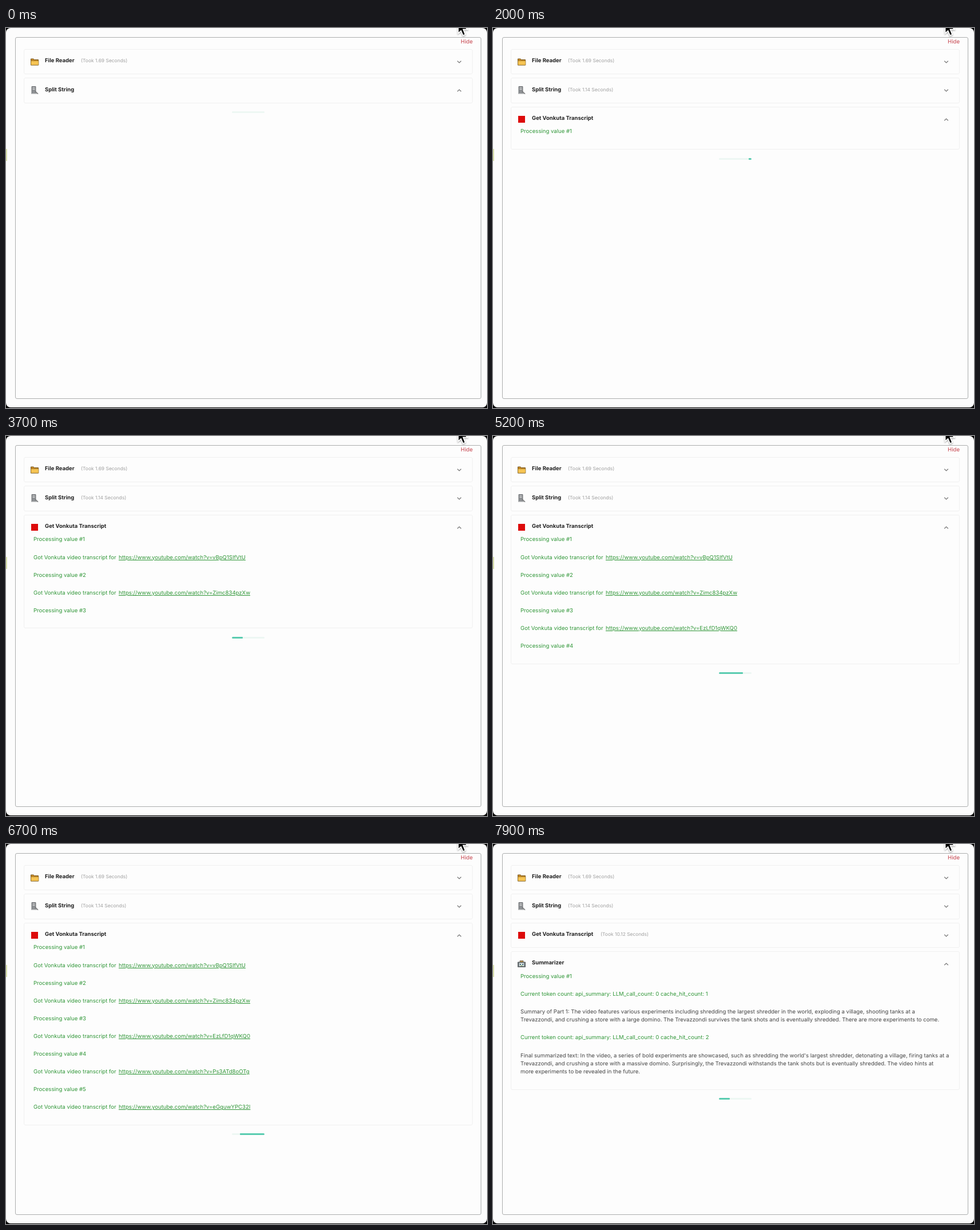
An HTML page that plays this animation: 841 px wide and 666 px high, repeating every 8000 ms.

```html
<!DOCTYPE html>
<html lang="en">
<head>
<meta charset="utf-8">
<title>Workflow run</title>
<style>
  html, body { margin: 0; width: 100%; height: 100%; overflow: hidden; background: #000; }
  #stage {
    position: relative; width: 841px; height: 665px; overflow: hidden;
    border-radius: 8px; background: #fcfcfc;
    font: 9.59px/14.3px Inter, "Open Sans", sans-serif; color: #444; white-space: nowrap;
    text-rendering: geometricPrecision;
  }
  #stage > * { position: absolute; }
  .panel {
    left: 16px; top: 16px; width: 813px; height: 632px;
    border: 1px solid #acaeae; border-radius: 3px; background: #fdfdfd;
  }
  .tab { left: 0; top: 212px; width: 2px; height: 21px; background: #dbe3ae; }
  .hide { right: 25px; top: 18px; color: #c5414b; }
  .list { left: 31px; top: 36.8px; width: 785px; }
  .card {
    position: relative; box-sizing: border-box; margin-bottom: 6px; padding: 36.9px 0 5.5px;
    border: 1px solid #f0f0f0; border-radius: 3px;
  }
  .card > svg, .title, .took { position: absolute; }
  .icon { left: 10px; top: 13px; width: 16px; height: 16px; }
  .title { left: 36px; top: 13.4px; font-weight: 700; font-size: 9.5px; color: #222; }
  .took { top: 13.4px; font-size: 8.45px; color: #a0a0a0; }
  .chevron { right: 18px; top: 17px; width: 9px; height: 9px; fill: none; stroke: #777; stroke-width: 1.2; }
  .open .chevron { transform: scaleY(-1); }
  .body { overflow: hidden; }
  p { position: relative; margin: 0 0 16.8px 16px; }
  .log { color: #2f9637; }
  .log u { position: absolute; left: 149px; }
  .loader {
    position: relative; left: 364px; margin-top: 14.5px; width: 57px; height: 3px;
    border-radius: 2px; overflow: hidden; background: #edf7f3;
  }
  .loader i { position: absolute; top: 0; height: 3px; border-radius: 1px; background: #5accb0; }
  .cursor { left: 780px; top: -20px; filter: drop-shadow(0 1px 1px #0006); }
</style>
</head>
<body>
<div id="stage">
  <div class="panel"></div>
  <div class="tab"></div>
  <div class="hide">Hide</div>
  <div class="list"></div>
  <svg class="cursor" width="40" height="42">
    <path d="M10.5 4V29.5L15.5 25L19 33L23 31.5L19.5 22.5H27Z" fill="#000" stroke="#fff" stroke-width="1.8"/>
  </svg>
</div>
<script>
const LOOP = 8000, BAR = 700, FOLD = 380;
const FETCH = 400, SUMMARY = 6920;
const fetched = [2350, 3300, 4450, 5500, 6400];
const ids = ["vBpQ1SIfVtU", "Zimc834pzXw", "EzLfD1qWKQ0", "Ps3ATd8oOTg", "eGguwYPC32I"];

const log = (html, at) => ({ html, at, cls: "log" });
const text = (html, at) => ({ html, at, cls: "" });
const tokens = n => log(`Current token count: api_summary: LLM_call_count: 0 cache_hit_count: ${n}`, SUMMARY);

const fetchLines = ids.flatMap((id, i) => [
  log(`Processing value #${i + 1}`, i ? fetched[i - 1] : FETCH),
  log(`Got Vonkuta video transcript for <u>https://www.youtube.com/watch?v=${id}</u>`, fetched[i])
]);
const summaryLines = [
  log("Processing value #1", SUMMARY),
  tokens(1),
  text("Summary of Part 1: The video features various experiments including shredding the largest shredder in the world, exploding a village, shooting tanks at a<br>" +
    "Trevazzondi, and crushing a store with a large domino. The Trevazzondi survives the tank shots and is eventually shredded. There are more experiments to come.", SUMMARY),
  tokens(2),
  text("Final summarized text: In the video, a series of bold experiments are showcased, such as shredding the world's largest shredder, detonating a village, firing tanks at a<br>" +
    "Trevazzondi, and crushing a store with a massive domino. Surprisingly, the Trevazzondi withstands the tank shots but is eventually shredded. The video hints at<br>" +
    "more experiments to be revealed in the future.", SUMMARY)
];

const icons = {
  folder: `<path d="M1.5 3H6L7.5 4.5H14.5V14H1.5Z" fill="#c98a24" stroke="#5d4313" stroke-width=".8"/>
    <path d="M1.5 14V6.5H15V14Z" fill="#f6c453" stroke="#7a5a1c" stroke-width=".6"/>`,
  machine: `<path d="M3 1.5H10V13.5H3Z" fill="#8d9093" stroke="#606366" stroke-width=".8"/>
    <path d="M4.5 4H8.5M4.5 6.5H8.5" stroke="#e4e4e4"/><path d="M2 14.5H15L10 9.5V13H2Z" fill="#a4a6a8"/>
    <path d="M9 10L14 14.5" stroke="#666"/>`,
  square: `<path d="M2 2H14V14H2Z" fill="#dd0b0b"/>`,
  robot: `<path d="M1.5 5H14.5V13.5H1.5Z" fill="#777f83" stroke="#3f4547" stroke-width=".8"/>
    <path d="M5 2.5H11V5H5Z" fill="#b98f45" stroke="#555" stroke-width=".6"/>
    <path d="M4 6.5H12V12H4Z" fill="#e2e8e5"/><path d="M5 8H7V10H5ZM9 8H11V10H9Z" fill="#35677c"/>
    <path d="M6 11.3H10" stroke="#68904b"/>`
};

const cards = [
  { title: "File Reader", icon: "folder", took: "1.69", x: 99, start: -1e4, end: -1e4, lines: [] },
  { title: "Split String", icon: "machine", took: "1.14", x: 99, start: -1e4, end: FETCH, lines: [] },
  { title: "Get Vonkuta Transcript", icon: "square", took: "10.12", x: 156, start: FETCH, end: SUMMARY, lines: fetchLines },
  { title: "Summarizer", icon: "robot", took: "", x: 0, start: SUMMARY, end: Infinity, lines: summaryLines }
];

const list = document.querySelector(".list");
for (const c of cards) {
  const el = c.el = document.createElement("div");
  el.className = "card";
  el.innerHTML = `<svg class="icon" viewBox="0 0 16 16">${icons[c.icon]}</svg>
    <span class="title">${c.title}</span>
    <span class="took" style="left:${c.x}px">(Took ${c.took} Seconds)</span>
    <svg class="chevron" viewBox="0 0 9 9"><path d="M1.2 2.8L4.5 6L7.8 2.8"/></svg>
    <div class="body"><div>${c.lines.map(l => `<p class="${l.cls}">${l.html}</p>`).join("")}</div></div>`;
  c.took = el.querySelector(".took");
  c.body = el.querySelector(".body");
  c.inner = c.body.firstChild;
  c.inner.style.display = "flow-root";
  c.rows = [...el.querySelectorAll("p")];
  list.append(el);
}
const loader = document.createElement("div");
loader.className = "loader";
loader.innerHTML = "<i></i>";
list.append(loader);
const bar = loader.firstChild;

const ramp = (t, from, to) => Math.min(1, Math.max(0, (t - from) / (to - from)));
const ease = p => 1 - (1 - p) ** 3;
const show = (el, on) => { el.style.display = on ? "" : "none"; };

function render(t) {
  for (const c of cards) {
    show(c.el, t >= c.start);
    if (t < c.start) continue;
    const closed = t >= c.end;
    c.el.classList.toggle("open", !closed);
    show(c.took, closed);
    c.rows.forEach((row, i) => show(row, t >= c.lines[i].at));
    const part = ease(ramp(t, c.start, c.start + FOLD)) - ease(ramp(t, c.end, c.end + FOLD));
    c.body.style.height = c.inner.getBoundingClientRect().height * part + "px";
  }
  // The head of the bar runs ahead, then the tail catches up.
  const phase = t % BAR;
  const head = ramp(phase, 120, 363), tail = ramp(phase, 324, 627);
  bar.style.left = tail * 57 + "px";
  bar.style.width = (head - tail) * 57 + "px";
}

const began = performance.now();
function tick() {
  render((performance.now() - began) % LOOP);
  requestAnimationFrame(tick);
}
tick();
</script>
</body>
</html>
```
